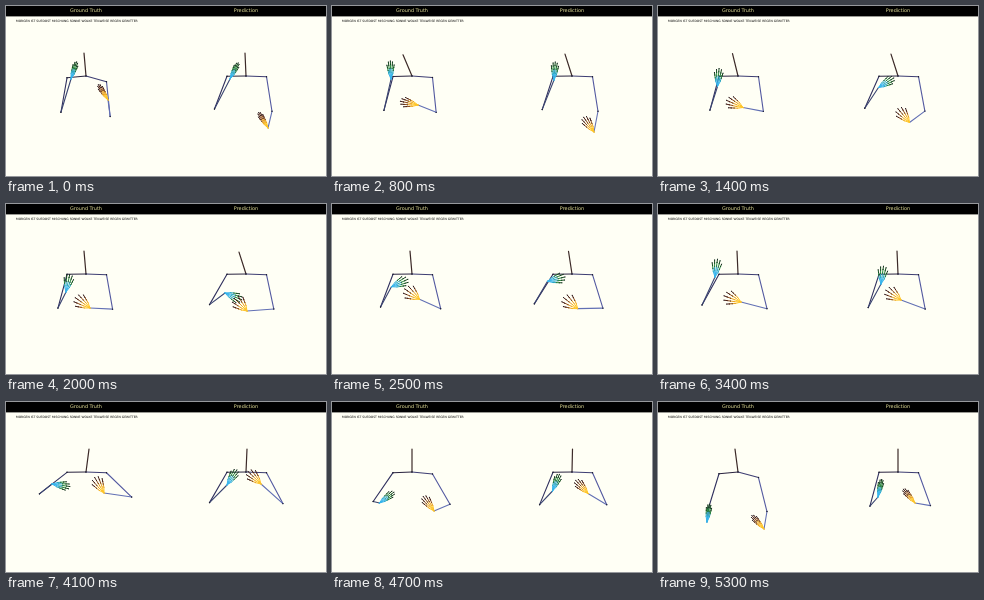
Write an HTML page with a canvas that moves like this. It is 320 by 170 pixels and loops after 5.4 s.

```html
<!DOCTYPE html>
<html lang="de">
<head>
<meta charset="utf-8">
<style>
html, body { margin: 0; width: 100%; height: 100%; overflow: hidden; background: #fffff5; }
canvas { display: block; }
</style>
</head>
<body>
<canvas id="stage" width="320" height="170"></canvas>
<script>
const ctx = document.getElementById('stage').getContext('2d');
const LOOP = 5400, STEP = 100;
const UPPER_ARM = 35, NECK = 23, HAND = 18;
const radians = degrees => degrees * Math.PI / 180;

// Key poses: head lean, then per arm (left, right): elbow swing, wrist x, y, hand angle.
// Wrist x is relative to the neck.
const times = [0, 800, 2000, 2900, 3400, 4100, 5300];
const truth = {
  neck: 80, sag: 5, poses: [
    [-2, 10, -15, 73, -72, 6, 22, 94, -122],
    [-9, 15, -21, 73, -92, 6, 6, 99, -168],
    [-2, 15, -20, 88, -78, 10, 4, 104, -145],
    [-2, 25, -21, 79, 14, 16, 10, 89, -145],
    [-1, 29, -23, 73, -82, 14, 3, 98, -160],
    [3, 52, -34, 82, 8, 46, 18, 91, -121],
    [-3, 17, -31, 120, -82, 14, 26, 127, -132]
  ]
};
const prediction = {
  neck: 240, sag: 0, poses: [
    [-1, 21, -16, 73, -63, 9, 22, 122, -121],
    [-7, 18, -18, 74, -86, 9, 22, 126, -125],
    [-7, 30, -21, 89, 22, 12, 1, 107, -135],
    [-1, 34, -27, 69, -40, 21, 9, 103, -147],
    [-1, 18, -17, 80, -82, 11, 3, 96, -147],
    [1, 30, -19, 83, -57, 28, 15, 82, -136],
    [0, 15, -20, 95, -78, 20, 17, 101, -130]
  ]
};

const leftStyle = { upper: '#30305e', lower: '#3a4470', hand: ['#35b4ec', '#2aa6bc', '#278a3c', '#175020'] };
const rightStyle = { upper: '#5359a0', lower: '#6270b4', hand: ['#ffc526', '#e8a020', '#94501e', '#4c2016'] };

function bone(x1, y1, x2, y2, color, width = 1.1) {
  ctx.strokeStyle = color;
  ctx.lineWidth = width;
  ctx.beginPath();
  ctx.moveTo(x1, y1);
  ctx.lineTo(x2, y2);
  ctx.stroke();
}

function joint(x, y, r = .7) {
  ctx.fillStyle = '#1c1c28';
  ctx.beginPath();
  ctx.arc(x, y, r, 0, 7);
  ctx.fill();
}

function hand(x, y, angle, gap, colors) {
  for (let finger = -2; finger <= 2; finger++) {
    const a = radians(angle + finger * gap);
    const length = HAND * (1 - .05 * finger * finger);
    const baseX = x - Math.sin(a) * finger * .5;
    const baseY = y + Math.cos(a) * finger * .5;
    let px = x, py = y;
    colors.forEach((color, k) => {
      const d = length * Math.pow((k + 1) / colors.length, .7);
      const qx = baseX + Math.cos(a) * d;
      const qy = baseY + Math.sin(a) * d;
      bone(px, py, qx, qy, color, 1);
      if (k) joint(qx, qy, .5);
      [px, py] = [qx, qy];
    });
  }
}

function arm(side, sx, sy, [swing, wx, wy, angle], gap, style) {
  const ex = sx + side * UPPER_ARM * Math.sin(radians(swing));
  const ey = sy + UPPER_ARM * Math.cos(radians(swing));
  bone(sx, sy, ex, ey, style.upper);
  bone(ex, ey, wx, wy, style.lower);
  joint(sx, sy);
  joint(ex, ey);
  hand(wx, wy, angle, gap, style.hand);
}

function poseAt(poses, t) {
  const next = Math.max(1, times.findIndex(time => time >= t));
  const from = times[next - 1];
  const p = (t - from) / (times[next] - from);
  const ease = p * p * (3 - 2 * p);
  return poses[next - 1].map((v, k) => v + (poses[next][k] - v) * ease);
}

function person({ neck, sag, poses }, t) {
  const [lean, ...arms] = poseAt(poses, t);
  const phase = Math.PI * t / LOOP;
  const drop = sag * Math.cos(phase) ** 16;
  const open = Math.sin(phase);
  const left = neck - 19, right = neck + 20.5;
  const leftY = 70.3 + drop * .3, rightY = 70.7 + drop;

  ctx.save();
  bone(neck, 70, neck + lean, 70 - Math.sqrt(NECK ** 2 - lean ** 2), '#3c2a28', 1.2);
  bone(neck, 70, left, leftY, '#29233f');
  bone(neck, 70, right, rightY, '#3d3d72');
  arms[1] += neck;
  arms[5] += neck;
  arm(-1, left, leftY, arms.slice(0, 4), 3 + 5 * open, leftStyle);
  arm(1, right, rightY, arms.slice(4), 3 + 10 * open, rightStyle);
  joint(neck, 70);
  ctx.restore();
}

function label(text, x, y, size, color, align) {
  ctx.font = `${size}px "DejaVu Sans", sans-serif`;
  ctx.fillStyle = color;
  ctx.textAlign = align;
  ctx.fillText(text, x, y);
}

function draw(now) {
  const t = Math.floor(now % LOOP / STEP) * STEP;
  ctx.fillStyle = '#fffff5';
  ctx.fillRect(0, 0, 320, 170);
  ctx.fillStyle = '#000';
  ctx.fillRect(0, 0, 320, 10.4);
  label('Ground Truth', 80, 5.8, 4.9, '#e6e29a', 'center');
  label('Prediction', 240, 5.8, 4.9, '#e6e29a', 'center');
  label('MORGEN IST SUEDOST MISCHUNG SONNE WOLKE TEILWEISE REGEN GEWITTER',
    10, 16.2, 3.05, '#000', 'left');
  person(truth, t);
  person(prediction, t);
}

ctx.lineCap = 'round';
const start = performance.now();
function tick() {
  draw(performance.now() - start);
  requestAnimationFrame(tick);
}
tick();
</script>
</body>
</html>
```
